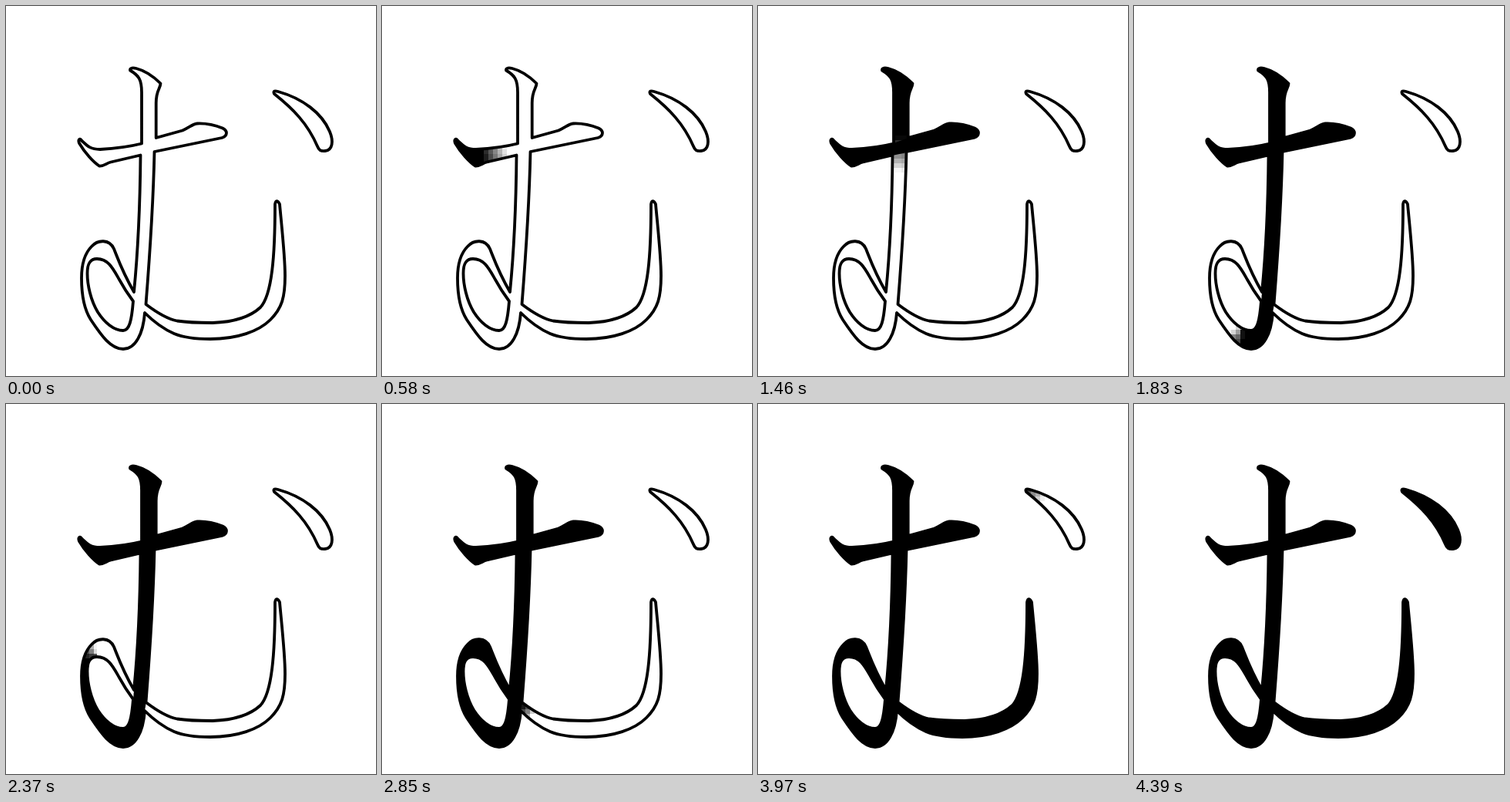
Animation, 480 px wide and 480 px high, one loop 4.72 s. Source, as an HTML page with a canvas:

```html
<!DOCTYPE html>
<html lang="ja">
<head>
<meta charset="utf-8">
<title>Stroke order</title>
<style>
  html, body { margin: 0; width: 100%; height: 100%; overflow: hidden; background: #fff; }
  canvas { display: block; width: 480px; height: 480px; }
</style>
</head>
<body>
<canvas id="stage" width="480" height="480"></canvas>
<script>
const LOOP = 4720, CELL = 6;
const ctx = document.getElementById('stage').getContext('2d');

const glyph = new Path2D(`
  M161 83.5 C160.5 80 165 80 169 81 C181 84 190 90 200.5 100.5
  C200 108 194.7 109 194.7 126 L194.7 171
  L229 161.5 C239 157 242 153 248 152.5 C258 152 272 155 281 158.5
  C288 162 287.5 168.5 280 171 L192.5 189
  C191 260 186 330 181.5 387
  C196 398 209 406 222 408.5 C238 411 255 411 268 411
  C295 410 316 404 330 391 C345 375 349 325 349 257
  C350 252 352.5 252 355 257 C358 290 362 325 362 350
  C362 378 358 392 343 407 C328 422 300 432 265 432
  C243 432 230 430 218 425 C202 418 192 410 180 398
  C178 425 168 445 152 445 C136 445 124 428 110 407
  C101 393 98 372 98 353 C98 335 102 321 111 312
  C119 303 134 302 140 315 C146 330 151 345 166 371
  C171 320 174 250 174.5 193.5
  L136 202.5 C130 204 127 208 121 207.5 C113 202 102 190 95 178
  C93 173 96 171 98 174.5 C104 180 108 186 122 186
  C140 185 158 183 176 178.5 L176 112 C176 95 172 90 161 83.5 Z
  M165 383 C163 408 160 421 152 421 C140 421 128 411 119 397
  C110 382 105.5 362 105.5 347 C105.5 336 108 328 118 328
  C133 328 139 341 147 355 C153 366 159 375 165 383 Z
  M348 114 C346 110 349 110 353 111 C385 120 410 139 420 163
  C425 175 424 187 414 188 C408 188.5 406 187 404 182
  C391 152 372 133 348 114 Z`);

// Ink front: [time, distance along the stroke]
const barKeys = [[460, 26], [820, 182], [880, 260]];
const mainKeys = [[1280, 45], [1770, 383], [1830, 397], [2310, 500], [2370, 517],
  [2850, 639], [2910, 660], [3090, 722], [3330, 848], [3390, 893], [3450, 930], [3510, 1040]];
const dotKeys = [[3970, 24], [4330, 98], [4390, 160]];

// area: rough region of the stroke; line: the way the brush travels
const parts = [
  { keys: barKeys, from: 0,
    area: 'M80 150 L140 176 L176 178 L195 171 L240 130 H300 V190 L193 190 L174 194 L100 230 Z',
    line: 'M94 174 L120 196 L250 162 L288 164' },
  { keys: mainKeys, from: 0,
    area: 'M150 60 H215 L195 300 L182 386 L180 398 L190 460 H80 V290 H118 V345 L165 384 L166 371 L150 300 Z',
    line: 'M163 82 L184 105 L185 190 L181 280 L174 385 L170 415 L154 433 L135 428 L112 400 L101 365 L101 335 L110 317 L119 315' },
  { keys: mainKeys, from: 517,
    area: 'M118 290 L150 300 L166 371 L182 386 L250 395 L330 240 H375 V450 H185 L180 398 L165 384 L118 345 Z',
    line: 'M119 315 L133 320 L145 347 L172 382 L200 408 L240 421 L290 420 L335 403 L352 370 L355 310 L351 253' },
  { keys: dotKeys, from: 0,
    area: 'M335 95 H440 V200 H335 Z',
    line: 'M349 112 L380 132 L404 160 L414 187' }
];

function buildCells(part) {
  const path = document.createElementNS('http://www.w3.org/2000/svg', 'path');
  path.setAttribute('d', part.line);
  const samples = [];
  for (let s = 0, end = path.getTotalLength(); s <= end; s += 2) {
    const p = path.getPointAtLength(s);
    samples.push([p.x, p.y, s]);
  }
  part.clip = new Path2D(part.area);
  part.cells = [];
  for (let y = 72; y < 456; y += CELL) {
    for (let x = 84; x < 438; x += CELL) {
      let best = 1600, at = 0;
      for (const [px, py, s] of samples) {
        const d = (px - x - CELL / 2) ** 2 + (py - y - CELL / 2) ** 2;
        if (d < best) { best = d; at = s; }
      }
      if (best < 1600) part.cells.push([x, y, at + part.from]);
    }
  }
}
parts.forEach(buildCells);

function valueAt(keys, t) {
  if (t < keys[0][0]) return 0;
  for (let i = 1; i < keys.length; i++) {
    const [t0, a] = keys[i - 1], [t1, b] = keys[i];
    if (t < t1) return a + (b - a) * (t - t0) / (t1 - t0);
  }
  return keys[keys.length - 1][1];
}

function front(keys, t) {
  const start = keys[0][0], end = keys[keys.length - 1][0];
  t = Math.min(t, end);
  const early = keys === mainKeys && t < 1830;
  const step = early ? 70 : 60;
  const base = keys === mainKeys && !early ? 1830 : start;
  const tick = base + Math.floor((t - base) / step) * step;
  const reach = valueAt(keys, tick);
  const moved = reach - valueAt(keys, tick - step);
  return { reach, fade: Math.max(12, Math.min(45, moved * 1.3)) };
}

function drawPart(part, t) {
  if (t < part.keys[0][0]) return;
  const { reach, fade } = front(part.keys, t);
  ctx.save();
  ctx.clip(glyph, 'evenodd');
  ctx.clip(part.clip);
  const solid = new Path2D();
  for (const [x, y, s] of part.cells) {
    const alpha = (reach - s) / fade;
    if (alpha >= 1) {
      solid.rect(x, y, CELL, CELL);
    } else if (alpha > 0) {
      ctx.globalAlpha = alpha;
      ctx.fillRect(x, y, CELL, CELL);
    }
  }
  ctx.globalAlpha = 1;
  ctx.fill(solid);
  ctx.restore();
}

function draw(t) {
  ctx.fillStyle = '#fff';
  ctx.fillRect(0, 0, 480, 480);
  ctx.fillStyle = ctx.strokeStyle = '#000';
  ctx.lineWidth = 3.8;
  ctx.lineJoin = 'round';
  if (t >= 4390) ctx.fill(glyph, 'evenodd');
  else parts.forEach(part => drawPart(part, t));
  ctx.stroke(glyph);
}

const begin = performance.now();
function frame() {
  draw((performance.now() - begin) % LOOP);
  requestAnimationFrame(frame);
}
frame();
</script>
</body>
</html>
```
